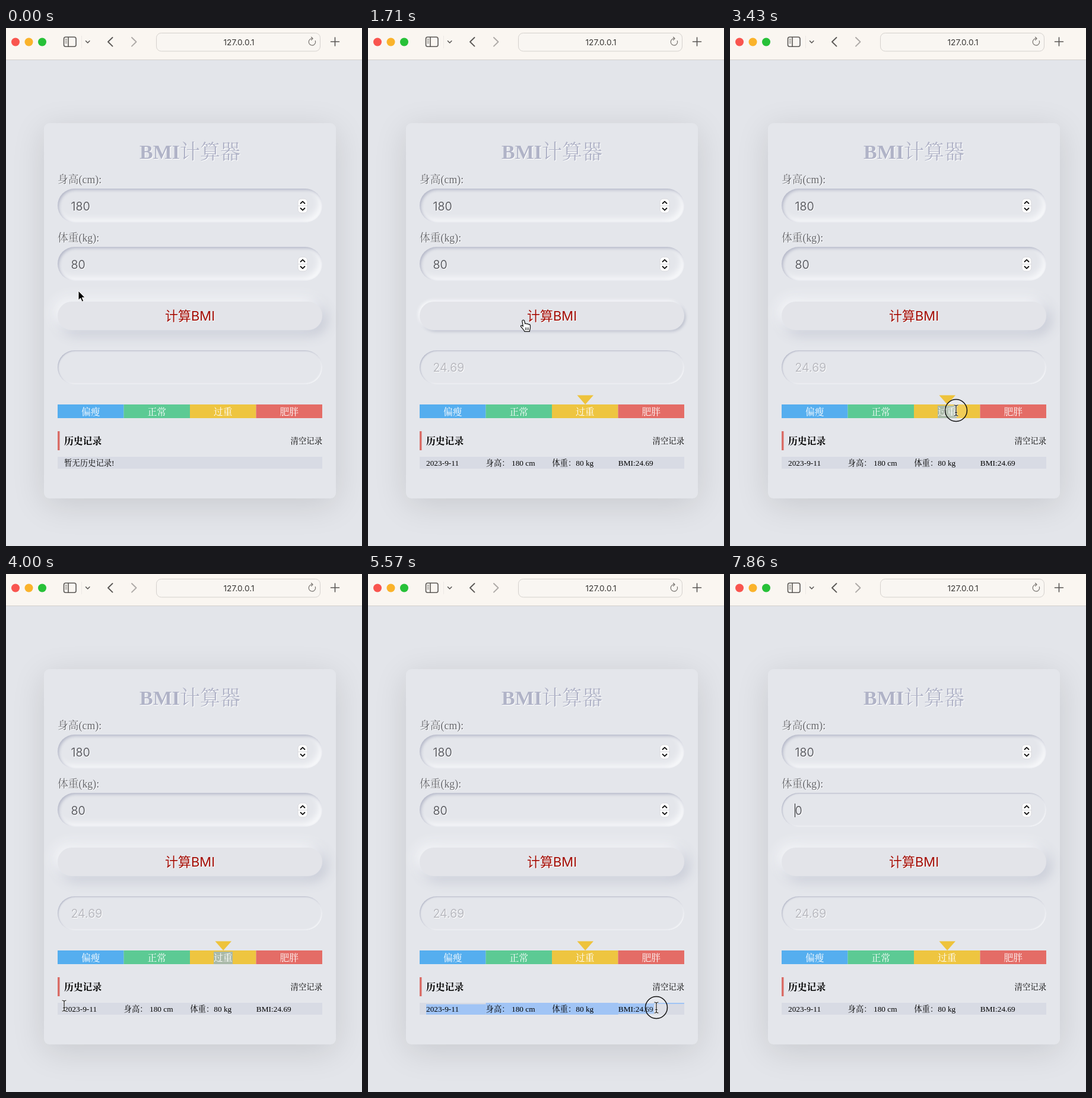
These frames come from a looping animation (600x871 px, 8000 ms). An HTML page:

```html
<!DOCTYPE html>
<html lang="zh-CN">
<head>
<meta charset="utf-8">
<title>BMI</title>
<style>
  html, body { margin: 0; width: 100%; height: 100%; overflow: hidden; background: #e3e5ea; }
  #stage { position: relative; width: 600px; height: 871px; overflow: hidden; background: #e3e5ea; }
  #stage > * { position: absolute; }
  #bar { left: 0; top: 0; width: 600px; height: 53px; background: #faf6f1; border-bottom: 1px solid #d2cfcc; }
  #card { left: 64px; top: 160px; width: 492px; height: 631px; border-radius: 9px; background: #e4e6eb;
    box-shadow: 0 11px 56px rgba(0,0,0,.12); }
  .pill { left: 87px; width: 446px; height: 57px; border-radius: 29px; }
  #button { top: 460px; height: 48px; background: #e3e4e9; }
  svg { left: 0; top: 0; }
  text { white-space: pre; }
  .serif { font-family: 'Liberation Serif', 'Noto Serif CJK SC', 'Noto Sans CJK SC', serif; }
  .sans { font-family: Inter, 'Noto Sans CJK SC', sans-serif; }
  .lift { text-shadow: 1px 1px 0 #fff; }
  .line { fill: none; stroke: #5b5856; stroke-width: 1.6; stroke-linecap: round; stroke-linejoin: round; }
</style>
</head>
<body>
<div id="stage">
  <div id="bar"></div>
  <div id="card"></div>
  <div id="height" class="pill" style="top:270px"></div>
  <div id="weight" class="pill" style="top:368px"></div>
  <div id="button" class="pill"></div>
  <div id="result" class="pill" style="top:542px"></div>
  <svg id="art" width="600" height="871" viewBox="0 0 600 871">
    <g id="chrome">
      <circle cx="16" cy="23.5" r="7" fill="#f9554f"/>
      <circle cx="38.5" cy="23.5" r="7" fill="#fab32b"/>
      <circle cx="61" cy="23.5" r="7" fill="#27c138"/>
      <g class="line">
        <rect x="97.5" y="15.2" width="20.5" height="16" rx="3"/>
        <path d="M105 15.5V31"/>
        <path d="M100 19h2.6M100 22h2.6M100 25h2.6" stroke-width="1"/>
        <path d="M134.5 21.8l3.2 3.2 3.2-3.2"/>
        <path d="M179.5 16l-7.5 7.3 7.5 7.3" stroke-width="1.9"/>
        <path d="M212 16l7.5 7.3-7.5 7.3" stroke="#aeaaa7" stroke-width="1.9"/>
        <path d="M547.5 23h14M554.500 16v14"/>
      </g>
      <path d="M127.500 13v21" stroke="#ece8e4"/>
      <rect x="253.500" y="8.500" width="276" height="30.500" rx="8" fill="#f9f6f2" stroke="#d5d1cd"/>
      <path class="line" d="M521.300 21.500a5.700 5.700 0 1 1-4.500-3.700M514.500 15.300l2.600 2.500-2.600 2.600" stroke="#77736f" style="stroke-width:1.200;stroke:#77736f"/>
    </g>
    <g id="back"></g>
    <g id="select"></g>
    <g id="words"></g>
    <path id="marker" d="M352.500 617.500h27.500L366.200 633z" fill="#eec33c"/>
    <rect id="caret" y="386" width="1" height="23" fill="#222"/>
    <circle id="ring" r="18.500" fill="rgba(255,255,255,.12)" stroke="#111" stroke-width="1.500"/>
    <g id="arrow"><path d="M0 0V15.500L3.600 12.300 6.100 18.200 8.700 17.100 6.200 11.300H11Z" fill="#000" stroke="#fff" stroke-width="1" stroke-linejoin="round"/></g>
    <g id="hand">
      <path d="M-2.200 1.800C-2.200-.4 1.200-.6 1.700 1.500L2.800 6.500C3.200 5.400 5.600 5.500 5.900 7 6.600 6 8.600 6.400 8.900 7.900 9.700 7.100 11.500 7.500 11.500 9.200V13C11.500 16 10.300 16.500 10.300 19.300H1.900C1 16.500-3.400 12.700-4.500 10.600-4.700 8.700-2.500 8.400-.6 10.800Z" fill="#fff" stroke="#111" stroke-width="1.200" stroke-linejoin="round"/>
      <path d="M3.500 12.500v4.500M5.900 12.500v4.500M8.300 12.500v4.500" stroke="#111" stroke-width=".9"/>
    </g>
    <g id="beam" fill="none">
      <path d="M-3.500-9Q0-9 0-6.500 0-9 3.500-9M0-6.500V6.500M-3.500 9Q0 9 0 6.500 0 9 3.500 9M-1.800 3.500H1.800" stroke="#fff" stroke-width="2.600"/>
      <path d="M-3.500-9Q0-9 0-6.500 0-9 3.500-9M0-6.500V6.500M-3.500 9Q0 9 0 6.500 0 9 3.500 9M-1.800 3.500H1.800" stroke="#111" stroke-width="1.200"/>
    </g>
  </svg>
</div>
<script>
const $ = id => document.getElementById(id);
const NS = 'http://www.w3.org/2000/svg';
const LOOP = 8000, RATE = 7;
const COLS = [98, 198.6, 310.2, 421.8, 533];

function add(parent, tag, attrs, content) {
  const el = document.createElementNS(NS, tag);
  for (const key in attrs) el.setAttribute(key, attrs[key]);
  if (content) el.textContent = content;
  parent.appendChild(el);
  return el;
}
const rect = (parent, x, y, width, height, fill) => add(parent, 'rect', { x, y, width, height, fill });
const label = (content, x, y, size, fill, kind = 'serif', more = {}) =>
  add($('words'), 'text', { x, y, 'font-size': size, fill, class: kind, ...more }, content);
const show = (el, on) => { el.style.display = on ? '' : 'none'; };
const mid = { 'text-anchor': 'middle' };

// Static parts
const title = label('', 310, 220, 34, '#b0b3c7', 'serif lift', mid);
add(title, 'tspan', { 'font-weight': 700 }, 'BMI');
add(title, 'tspan', {}, '计算器');
label('127.0.0.1', 392.5, 28.5, 13.7, '#383634', 'sans', mid);
label('身高(cm):', 87, 261, 17.8, '#66676c', 'serif lift');
label('体重(kg):', 87, 359, 17.8, '#66676c', 'serif lift');
label('180', 109.5, 306.5, 19.5, '#5f6066', 'sans lift');
const weightText = label('80', 109.5, 404.5, 19.5, '#5f6066', 'sans lift');
label('计算BMI', 310, 492, 22, '#a30d05', 'sans lift', mid);
const resultText = label('24.69', 109.5, 578, 19.5, '#b9bac0', 'sans lift');

[['偏瘦', '#55aeef'], ['正常', '#5cca94'], ['过重', '#eec540'], ['肥胖', '#e46c66']].forEach(([name, fill], i) => {
  rect($('back'), 87 + i * 111.5, 633, 111.5, 23, fill);
  label(name, 142.8 + i * 111.5, 651, 15.8, '#fff', 'serif', mid);
});
rect($('back'), 87, 678, 3.5, 32, '#d96c66');
rect($('back'), 87, 721, 446, 20, '#d8dbe4');
label('历史记录', 98, 699.5, 15.8, '#000', 'serif', { 'font-weight': 700 });
label('清空记录', 533, 699, 13.35, '#000', 'serif', { 'text-anchor': 'end' });
const emptyText = label('暂无历史记录!', 98, 736, 13.35, '#000');
const record = ['2023-9-11', '身高： 180 cm', '体重：80 kg', 'BMI:24.69']
  .map((s, i) => label(s, COLS[i], 736, 13.35, '#000'));

for (const y of [299, 397]) {
  add($('back'), 'rect', { x: 492, y: y - 12, width: 16, height: 24, rx: 6, fill: '#fdfdfd', stroke: '#d3d4d8', 'stroke-width': .8 });
  add($('back'), 'path', { d: `M492 ${y}h16`, stroke: '#d5d6da' });
  add($('back'), 'path', {
    d: `M496.500 ${y - 4}l3.500-3.300 3.500 3.300M496.500 ${y + 4}l3.500 3.300 3.500-3.300`,
    fill: 'none', stroke: '#111', 'stroke-width': 1.8, 'stroke-linecap': 'round', 'stroke-linejoin': 'round'
  });
}

// Selection pieces
const charSel = rect($('select'), 350, 635, 32, 21, '#a9b9a8');
const rowSel = COLS.slice(0, 4).map(() => rect($('select'), 0, 721, 0, 20, '#a0c4f5'));
const restSel = rect($('select'), 0, 721, 0, 2, '#a0c4f5');

// Pointer path: step, x, y, shape
const PATH = [
  [0, 122, 442, 'arrow'], [4, 136, 448, 'arrow'], [6, 136, 448, 'arrow'], [9, 250, 486, 'arrow'],
  [10, 262, 491, 'arrow'], [14, 262, 491, 'arrow'], [17, 300, 560, 'arrow'], [20, 344, 642, 'beam'],
  [21, 350, 644, 'beam'], [22, 352, 644, 'beam'], [24, 381, 643, 'beam'], [25, 381, 643, 'beam'],
  [27, 220, 694, 'arrow'], [28, 98, 726, 'beam'], [29, 98, 726, 'beam'], [31, 180, 734, 'beam'],
  [32, 249, 735, 'beam'], [33, 348, 735, 'beam'], [36, 440, 737, 'beam'], [38, 482, 730, 'beam'],
  [39, 486, 729, 'beam'], [40, 486, 729, 'beam'], [42, 446, 751, 'arrow'], [43, 446, 751, 'arrow'],
  [47, 170, 404, 'beam'], [48, 152, 382, 'beam'], [50, 122, 398, 'beam'], [56, 122, 398, 'beam']
];
const PRESSES = [[10, 10], [22, 24], [29, 39], [42, 42], [51, 51]];

function pointer(k) {
  const i = Math.max(1, PATH.findIndex((p, n) => n && p[0] > k));
  const [k0, x0, y0, shape] = PATH[i - 1], [k1, x1, y1] = PATH[i];
  const u = Math.max(0, k - k0) / (k1 - k0);
  const x = x0 + (x1 - x0) * u, y = y0 + (y1 - y0) * u;
  const over = x > 87 && x < 533 && y > 460 && y < 508;
  return { x, y, over, shape: over ? 'hand' : shape };
}

const mix = (a, b, u) => a + (b - a) * u;
function sunken(el, focus) {
  const dark = mix(2.2, 1.1, focus), darkBlur = mix(5.6, 2.2, focus);
  const light = mix(5.6, 1.1, focus), lightBlur = mix(11, 2.2, focus);
  el.style.boxShadow = `inset ${dark}px ${dark}px ${darkBlur}px #b3b6c7, inset ${-light}px ${-light}px ${lightBlur}px #f8f9fb`;
}
function raised(el, hover) {
  const d = mix(5.6, 2.2, hover), blur = mix(22, 5.6, hover);
  el.style.boxShadow = `${-d}px ${-d}px ${blur}px #f8f9fb, ${d}px ${d}px ${blur}px #babecc`;
}

function selectRow(k) {
  const on = k >= 30 && k < 42;
  const end = Math.min(482, pointer(Math.min(k, 39) - 1).x);
  const last = COLS.findLastIndex(c => c < end);
  rowSel.forEach((r, i) => {
    const top = i === 0 ? 723.5 : i === last ? 722 : 721;
    r.setAttribute('x', COLS[i]);
    r.setAttribute('y', top);
    r.setAttribute('width', on && i <= last ? Math.min(end, COLS[i + 1]) - COLS[i] : 0);
    r.setAttribute('height', (i === last ? 739.5 : 741) - top);
  });
  restSel.setAttribute('x', end);
  restSel.setAttribute('width', on && last >= 0 ? COLS[last + 1] - end : 0);
}

function draw(t) {
  const k = Math.floor((t + 5) * RATE / 1000);
  const p = pointer(k);
  const pressed = PRESSES.some(([a, b]) => k >= a && k <= b);
  const done = k >= 11, focus = k >= 51;

  sunken($('height'), 0);
  sunken($('weight'), k > 51 ? 1 : focus ? .7 : 0);
  sunken($('result'), 1);
  if (pressed && p.over) sunken($('button'), 1);
  else raised($('button'), .8 * p.over + .2 * pointer(Math.max(0, k - 1)).over);

  show(resultText, done);
  show($('marker'), done);
  show(emptyText, !done);
  record.forEach(el => show(el, done));

  show(charSel, k >= 23 && k < 29);
  charSel.setAttribute('width', Math.max(0, pointer(Math.min(k, 24)).x - 349));
  selectRow(k);

  weightText.textContent = k < 55 ? '80' : '0';
  show($('caret'), focus);
  $('caret').setAttribute('x', k < 55 ? 122 : 109);

  const place = `translate(${p.x} ${p.y})`;
  for (const id of ['arrow', 'hand', 'beam']) {
    show($(id), id === p.shape && k < 55);
    $(id).setAttribute('transform', place);
  }
  show($('ring'), pressed);
  $('ring').setAttribute('transform', place);
}

function tick(now) {
  draw(now % LOOP);
  requestAnimationFrame(tick);
}
draw(0);
requestAnimationFrame(tick);
</script>
</body>
</html>
```
